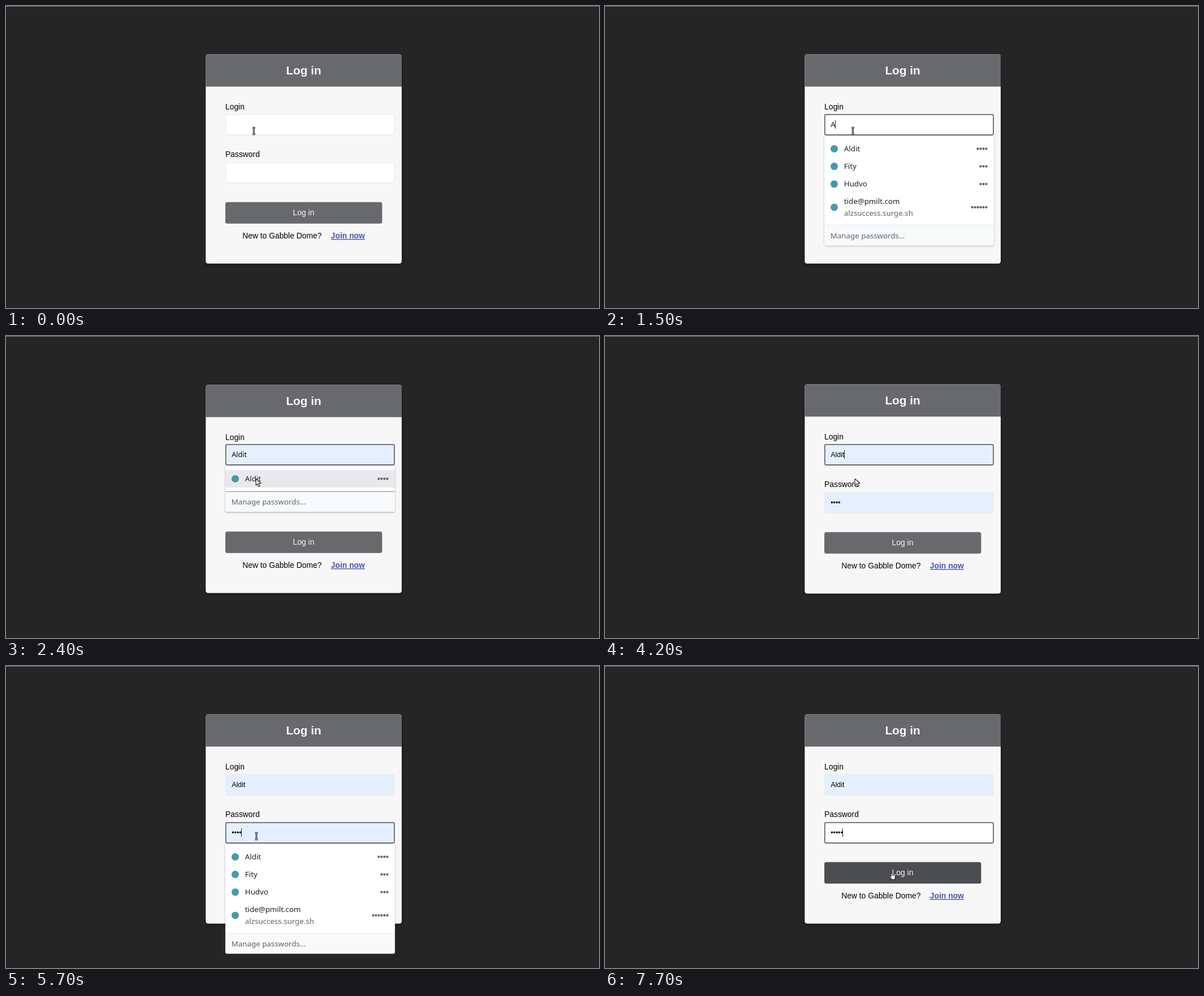
An HTML page that plays this animation: 1049x534 px, repeating every 8000 ms.

```html
<!DOCTYPE html>
<html lang="en">
<head>
<meta charset="utf-8">
<title>Log in</title>
<style>
  html, body { margin: 0; width: 100%; height: 100%; overflow: hidden; background: #252526; }
  svg { display: block; width: 100%; height: 100%; }
  text { font: 13.87px "Liberation Sans", Arial, sans-serif; white-space: pre; }
  .title { font-size: 20.8px; font-weight: bold; }
  .value { font-size: 12.48px; }
  .link { font-weight: bold; text-decoration: underline; }
  .menu { font: 13.3px "Noto Sans", "Open Sans", sans-serif; }
  .preview { font: 12.6px "Noto Sans", "Open Sans", sans-serif; }
  .card { filter: drop-shadow(0 2px 2px rgba(0, 0, 0, .35)); }
  .popup { filter: drop-shadow(0 1.5px 1.5px rgba(60, 64, 67, .38)); }
</style>
</head>
<body>
<svg id="stage" viewBox="0 0 1049 534"></svg>
<script>
const LOOP = 8000;
const GRAY = '#68696d', BLUE = '#e6efff', MUTED = '#5f6368', INK = '#202124';
const USER = 'Aldit';
const stage = document.getElementById('stage');

const rect = (x, y, w, h, fill, more = '') =>
  `<rect x="${x}" y="${y}" width="${w}" height="${h}" fill="${fill}" ${more}/>`;
const text = (x, y, str, fill = '#000', cls = '', more = '') =>
  `<text x="${x}" y="${y}" fill="${fill}" class="${cls}" ${more}>${str}</text>`;
const shift = (dx, dy, body, more = '') =>
  `<g transform="translate(${dx} ${dy})" ${more}>${body}</g>`;

// Each step overrides only what changes from the one before.
const steps = [
  { at: 0, login: {}, password: {}, menu: null, squeeze: 0, hover: false,
    cursor: ['beam', 438.4, 221] },
  { at: 800, login: { focus: true, caret: 399 }, menu: { y: 229 } },
  { at: 1400, login: { focus: true } },
  { at: 1500, login: { focus: true, value: 'A', caret: 407 } },
  { at: 1600, menu: { y: 229, short: true } },
  { at: 2100, cursor: ['arrow', 440, 240], squeeze: 1,
    login: { focus: true, value: USER, filled: true, cls: 'preview' },
    password: { filled: true }, menu: { y: 229, short: true, active: true } },
  { at: 2200, cursor: ['arrow', 441, 245] },
  { at: 2300, cursor: ['arrow', 441, 249] },
  { at: 2400, cursor: ['arrow', 441.5, 252] },
  { at: 4200, squeeze: 0, menu: null,
    login: { focus: true, value: USER, filled: true, caret: 423 },
    password: { filled: true, value: '••••' } },
  { at: 4600, cursor: null },
  { at: 4900, cursor: ['beam', 447, 296], login: { focus: true, value: USER, filled: true } },
  { at: 5700, cursor: ['beam', 443, 301], login: { value: USER, filled: true },
    password: { focus: true, filled: true, value: '••••', caret: 416 }, menu: { y: 314 } },
  { at: 6300, password: { focus: true, filled: true, value: '••••' } },
  { at: 6700, password: { focus: true, value: '•••••', caret: 420 }, menu: null },
  { at: 7100, password: { focus: true, value: '•••••' }, hover: true, cursor: ['hand', 504, 364] },
  { at: 7700, password: { focus: true, value: '•••••', caret: 420 }, cursor: ['hand', 502, 365] }
];

function field(y, { value = '', filled, focus, caret, cls = 'value' }) {
  const edge = focus ? `stroke="${GRAY}" stroke-width="1.8"` : 'stroke="#ececee" stroke-width="1.3"';
  return rect(388.8, y + .8, 298.2, 36.2, filled ? BLUE : '#fff', `rx="2.4" ${edge}`) +
    text(399.2, y + 23, value, '#000', cls) +
    (caret ? rect(caret, y + 11, 1, 15, '#222') : '');
}

function card({ login, password, hover, squeeze: s }) {
  const panel = rect(353.3, 85.3 + s, 346.7, 370.2 - 2 * s, '#f7f7f7', 'rx="4.3" class="card"');
  const head = `<path d="M353.3 142.5V89.6q0-4.3 4.3-4.3H695.7q4.3 0 4.3 4.3V142.5z" fill="${GRAY}"/>` +
    text(526.6, 121.4, 'Log in', '#f7f7f7', 'title', 'text-anchor="middle"') +
    text(388, 182.8, 'Login');
  const foot = rect(388, 346.8, 277.4, 38, hover ? '#4c4d50' : GRAY, 'rx="3.5"') +
    text(526.5, 370.2, 'Log in', '#f7f7f7', '', 'text-anchor="middle"') +
    text(418.2, 411, 'New to Gabble Dome?') +
    text(574.8, 411, 'Join now', '#4a57ad', 'link');
  return panel + shift(0, s, head) + text(388, 267, 'Password') +
    field(191, login) + field(276, password) + shift(0, -s, foot);
}

function entry(y, name, dots, note = '') {
  const mid = note ? y + 5.5 : y - 4.6;
  let out = `<circle cx="405.5" cy="${mid}" r="6.5" fill="#479aa8"/>` + text(422.8, y, name, INK, 'menu');
  if (note) out += text(422.8, y + 20.6, note, MUTED, 'menu');
  for (let i = 0; i < dots; i++) out += `<circle cx="${674.4 - 5 * i}" cy="${mid}" r="2.1" fill="${MUTED}"/>`;
  return out;
}

function menu({ y, short, active }) {
  const height = short ? 81.7 : 194.5, line = short ? 46 : 158.5;
  const rows = short
    ? (active ? rect(388, 8, 300, 31, '#e8e9ec') : '') + entry(28, USER, 4)
    : entry(28, USER, 4) + entry(59.2, 'Fity', 3) + entry(90.4, 'Hudvo', 3) +
      entry(121.4, 'tide@pmilt.com', 6, 'alzsuccess.surge.sh');
  return shift(0, y,
    rect(388, 0, 300, height, '#fff', 'rx="3" class="popup"') + rows +
    `<path d="M388 ${line}H688V${height - 3}q0 3-3 3H391q-3 0-3-3z" fill="#f8f9fb"/>` +
    rect(388, line - .6, 300, 1.2, short ? '#8f918e' : '#e8eaed') +
    text(398.8, line + 23.4, 'Manage passwords…', MUTED, 'menu'));
}

const outlined = (d, more = '') =>
  `<path d="${d}" fill="#fff" stroke="#222" stroke-width="1.1" stroke-linejoin="round" ${more}/>`;
const beamPath = 'M-2.4-5.8H-1Q0-5.8 0-4.8V4.8Q0 5.8-1 5.8H-2.4M2.4-5.8H1Q0-5.8 0-4.8M2.4 5.8H1Q0 5.8 0 4.8';
const cursors = {
  beam: `<path d="${beamPath}" fill="none" stroke="#222" stroke-width="2.9"/>` +
    `<path d="${beamPath}" fill="none" stroke="#ddd" stroke-width=".9"/>`,
  arrow: outlined('M.5.5V11.8L3.2 9.4 5.3 14.2 7.6 13.2 5.5 8.5H9.6z'),
  hand: outlined('M4 8V1.8Q4 .6 5.1.6T6.3 1.8V4.8L10.2 5.5Q11.7 5.8 11.6 7.4L11 10.3V12.6H4.5V11L1 8Q.2 6.9 1.2 6.3T3 6.9z')
};

function draw(state) {
  const { cursor } = state;
  stage.innerHTML = rect(0, 0, 1049, 534, '#252526') + rect(0, 0, 1049, 1, '#858585') +
    card(state) + (state.menu ? menu(state.menu) : '') +
    (cursor ? shift(cursor[1], cursor[2], cursors[cursor[0]]) : '');
}

let shown = -1;
function frame() {
  const now = performance.now() % LOOP;
  const past = steps.filter(step => step.at <= now);
  if (past.length !== shown) {
    shown = past.length;
    draw(Object.assign({}, ...past));
  }
  requestAnimationFrame(frame);
}
frame();
</script>
</body>
</html>
```
